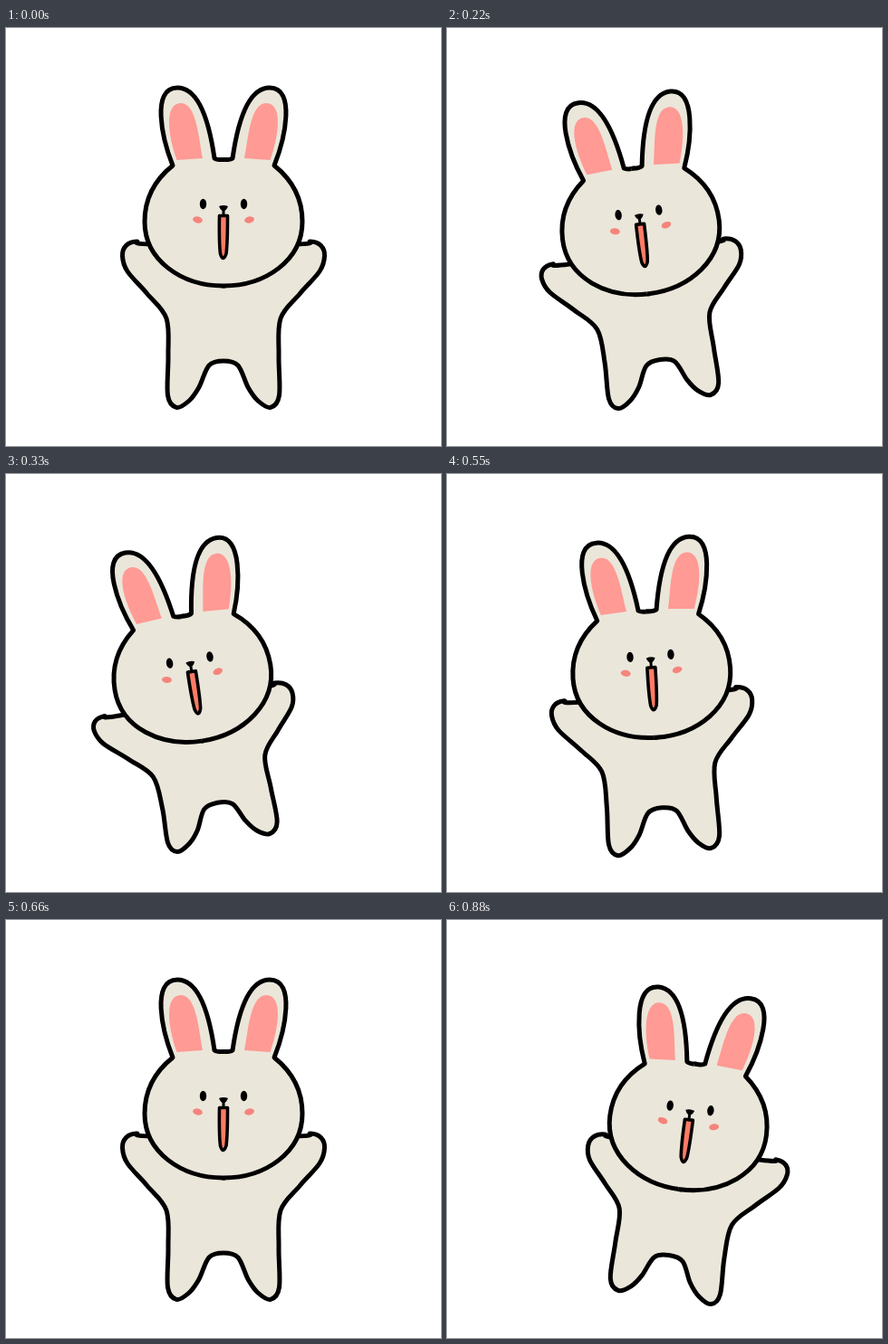
Write an HTML page that moves like this. It is 480 px wide and 462 px high and loops after 990 ms.

```html
<!DOCTYPE html>
<html lang="en">
<head>
<meta charset="utf-8">
<title>Swaying bunny</title>
<style>
  html, body { margin: 0; width: 100%; height: 100%; overflow: hidden; background: #fff; }
  svg { display: block; width: 100%; height: 100%; }
  .outline { fill: #ebe6da; stroke: #000; stroke-width: 5; stroke-linejoin: round; }
  .ear { fill: #ff9a94; }
  .cheek { fill: #f5857c; }
  .mouth { fill: #ff7b66; stroke: #000; stroke-width: 3.6; stroke-linejoin: round; }
</style>
</head>
<body>
<svg viewBox="0 0 480 462">
  <path id="body" class="outline"/>
  <g id="head">
    <!-- Left half of the face; it overlaps its mirror image a little to hide the seam -->
    <g id="side">
      <path class="outline" d="M242 145.5H240Q233 146 230 144C226 116 216 66 189 66C160 66 172 122 184 152
        C164 168 153 188 153 214C153 257 194 285 240 285H242"/>
      <path class="ear" d="M188.5 146C178 116 175 83 193 83C211 83 213 126 217 144Z"/>
      <ellipse cx="217.5" cy="194.5" rx="3.7" ry="5.7"/>
      <ellipse class="cheek" cx="211.5" cy="212" rx="5.5" ry="3.5" transform="rotate(14 211.5 212)"/>
    </g>
    <use href="#side" transform="matrix(-1 0 0 1 480 0)"/>
    <path d="M235 197q5-2 10 0q-1 3-3.500 5v5h-3v-5q-2.500-2-3.500-5z"/>
    <path class="mouth" d="M235.5 207.5h9q0 30-1.500 42q-3.500 10-6.500 0q-1.500-12-1-42z"/>
  </g>
</svg>
<script>
  const STEP = 110, STEPS = 9, CENTRE = 240, FOOT = 421, HAND = 253;

  // Right side from crotch over foot, waist and hand to neck: [offset from centre, y]
  const side = [
    [0, 368], [16, 373], [27, 397], [38, 412], [52, 419.3], [61.5, 406], [61, 362],
    [63, 321], [84, 294], [106, 269], [111.5, 252], [107.5, 240.5], [96, 236], [78, 239]
  ];
  const mirrored = side.slice(1).reverse().map(([dx, y]) => [-dx, y]);
  const outline = [...side, ...mirrored];

  // Closed smooth curve through all points
  function smooth(points) {
    const at = i => points[(i + points.length) % points.length];
    const handle = (i, sign) => at(i).map((v, axis) => v + sign * (at(i + 1)[axis] - at(i - 1)[axis]) / 6);
    const curves = points.map((_, i) => `C${handle(i, 1)} ${handle(i + 1, -1)} ${at(i + 1)}`);
    return `M${points[0]}${curves.join('')}Z`;
  }

  const body = document.getElementById('body');
  const head = document.getElementById('head');

  function pose(step) {
    // Swings left to its peak, back, then part of the way right
    const wave = -Math.sin(step * Math.PI / 6);
    const sway = (wave + Math.asin(wave) * 2 / Math.PI) / 2;
    const size = Math.abs(sway);
    const side = Math.abs(sway) < .01 ? 0 : Math.sign(sway);
    const dip = 13 * Math.sqrt(size) + 2 * side;
    const foot = FOOT + 2 * side + 8 * size - 18 * size ** 2;

    const bend = ([dx, y]) => {
      const up = (FOOT - y) / (FOOT - HAND);
      return [
        CENTRE + dx * (1 - .02 * size) + 33 * sway * Math.max(0, up) ** 1.4,
        foot + .19 * sway * dx + up * (HAND + dip - foot)
      ];
    };
    body.setAttribute('d', smooth(outline.map(bend)));
    head.setAttribute('transform',
      `translate(${36.5 * sway} ${dip}) rotate(${9.3 * sway} ${CENTRE} 199)`);
  }

  let shown;
  function draw() {
    const step = Math.floor(performance.now() / STEP) % STEPS;
    if (step !== shown) pose(shown = step);
    requestAnimationFrame(draw);
  }
  draw();
</script>
</body>
</html>
```
